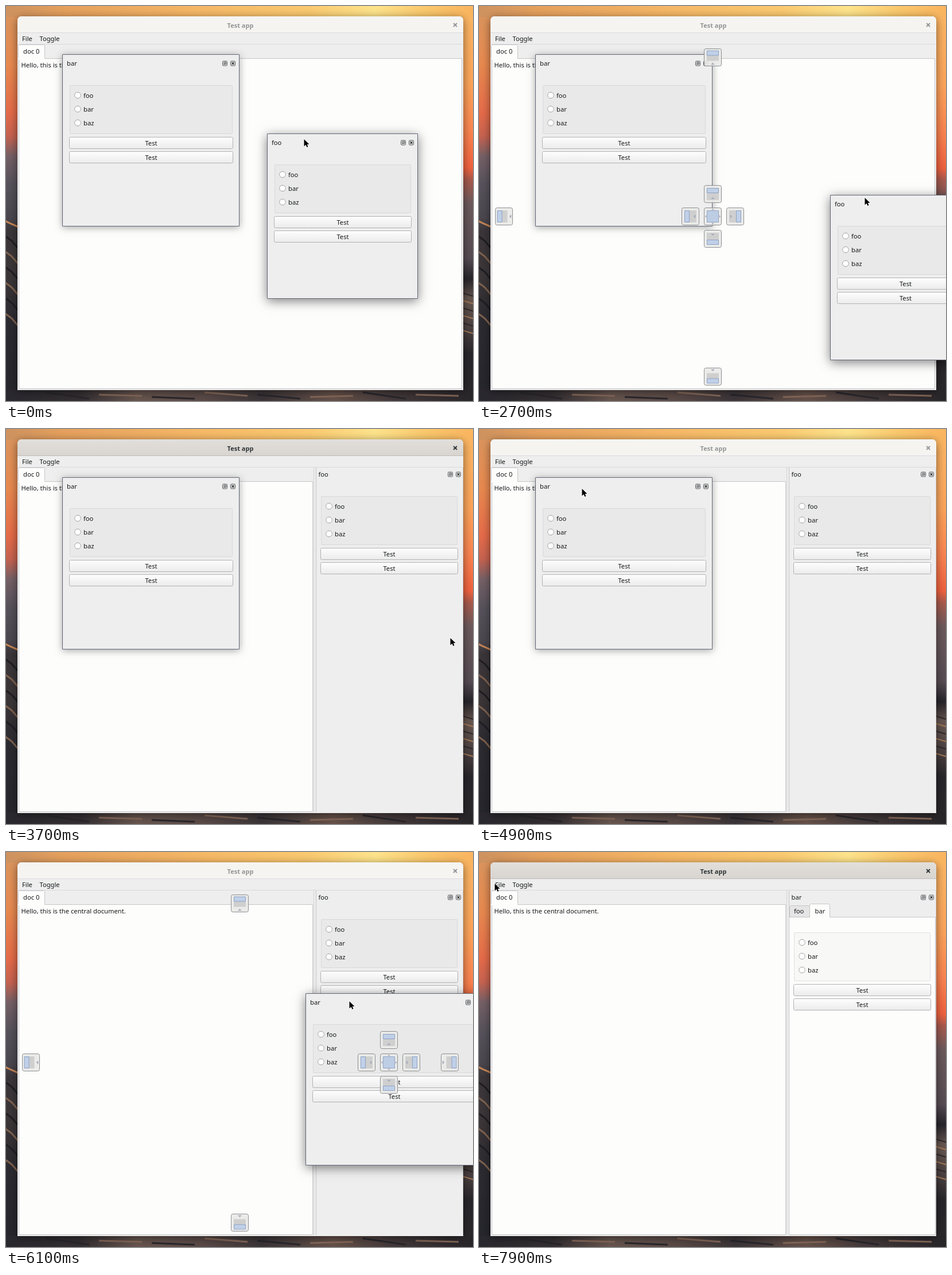
An HTML page with a canvas for the animation above (8 s loop, 814 by 688 pixels).

```html
<!DOCTYPE html>
<html lang="en">
<head>
<meta charset="utf-8">
<title>Test app</title>
<style>
html, body { margin: 0; width: 814px; height: 688px; overflow: hidden; }
canvas { display: block; }
</style>
</head>
<body>
<canvas id="stage" width="814" height="688"></canvas>
<script>
const c = document.getElementById('stage').getContext('2d');
const FONT = '11.2px "Noto Sans", sans-serif';
const BG = '#eeeeee', PAGE = '#fdfdfc', LINE = '#c6c6c8';
const LOOP = 8000;
const FOO = { start: 1000, drop: 3500 }, BAR = { start: 4900, drop: 6900 };

// Pointer stops: time, x, y
const stops = [
  [0, 519, 232], [1000, 519, 232], [1800, 519, 262], [2700, 672, 334],
  [3300, 774, 364], [3700, 774, 364], [4700, 179, 104], [4900, 179, 104],
  [5600, 515, 122], [6500, 661, 364], [6900, 661, 364], [7800, 27, 55], [LOOP, 27, 55]
];

function pointerAt(t) {
  const i = stops.findIndex(s => s[0] > t);
  const [t0, x0, y0] = stops[i - 1], [t1, x1, y1] = stops[i];
  const u = (t - t0) / (t1 - t0);
  const k = (u + u * u * (3 - 2 * u)) / 2;
  return { x: Math.round(x0 + (x1 - x0) * k), y: Math.round(y0 + (y1 - y0) * k) };
}

function gradient(x0, y0, x1, y1, colors) {
  const g = c.createLinearGradient(x0, y0, x1, y1);
  colors.forEach(([at, color]) => g.addColorStop(at, color));
  return g;
}

function rect(x, y, w, h, fill) {
  c.fillStyle = fill;
  c.fillRect(x, y, w, h);
}

function box(x, y, w, h, fill, stroke, r = 0) {
  c.beginPath();
  c.roundRect(x + .5, y + .5, w - 1, h - 1, r);
  if (fill) { c.fillStyle = fill; c.fill(); }
  if (stroke) { c.strokeStyle = stroke; c.lineWidth = 1; c.stroke(); }
}

function line(color, width, ...p) {
  c.beginPath();
  for (let i = 0; i < p.length; i += 2) c.lineTo(p[i], p[i + 1]);
  c.strokeStyle = color;
  c.lineWidth = width;
  c.stroke();
}

function text(s, x, y, color = '#16181a', align = 'left', font = FONT) {
  c.font = font;
  c.textAlign = align;
  c.fillStyle = color;
  c.fillText(s, x, y);
}

function shadowed(blur, dy, alpha, draw) {
  c.save();
  c.shadowColor = `rgba(0,0,0,${alpha})`;
  c.shadowBlur = blur;
  c.shadowOffsetY = dy;
  draw();
  c.restore();
}

function wallpaper() {
  rect(0, 0, 407, 688, gradient(0, 0, 0, 688, [
    [0, '#d9965f'], [.15, '#e8894f'], [.27, '#e56b49'], [.33, '#c66250'], [.38, '#756066'],
    [.45, '#57525b'], [.535, '#4b474f'], [.57, '#3a3539'], [.68, '#3b3537'],
    [.8, '#2b2a30'], [1, '#25252c']]));
  rect(407, 0, 407, 688, gradient(0, 0, 0, 688, [
    [0, '#fbb864'], [.2, '#fda45a'], [.32, '#fb8450'], [.41, '#f0623f'], [.44, '#a95a4d'],
    [.5, '#6d5a5d'], [.64, '#564c53'], [.69, '#27242a'], [.74, '#66564f'],
    [.82, '#4a4040'], [.88, '#29262b'], [1, '#2b282c']]));
  rect(0, 0, 814, 19, gradient(0, 0, 814, 0, [
    [0, '#cd925f'], [.12, '#e5a05d'], [.4, '#f6b766'], [.65, '#fbca70'],
    [.79, '#fee48c'], [.9, '#fbc86c'], [1, '#fab45f']]));
  rect(0, 668, 814, 20, gradient(0, 0, 814, 0, [
    [0, '#29282e'], [.16, '#342f32'], [.28, '#67554e'], [.42, '#5a4a47'],
    [.55, '#3a3437'], [.7, '#665149'], [.83, '#43393a'], [1, '#282529']]));
  // Wave crests and ripples
  line('#c78756', 3, -2, 374, 8, 379, 22, 385);
  for (let i = 0; i < 6; i++) {
    line(i % 2 ? '#806350' : '#1e1d23', 3, -2, 400 + i * 27, 10, 409 + i * 27, 22, 423 + i * 27);
    line(i % 2 ? '#a17756' : '#302b2e', 2, 796, 500 + i * 13, 816, 506 + i * 13);
  }
  for (let i = 0; i < 8; i++)
    line(i % 2 ? '#86695a' : '#29272c', 3, 70 + i * 92, 673 + i % 3 * 4, 145 + i * 92, 684 - i % 2 * 5);
}

function dockButtons(right, y) {
  for (const x of [right - 25.5, right - 11.5]) {
    box(x - 4.5, y - 4.5, 9, 9, '#e4e4e4', '#55585b', 1.5);
  }
  let x = right - 25.5;
  c.strokeRect(x - 1.5, y - 2, 3.5, 3.5);
  line('#55585b', 1, x - 2.5, y + 2.5, x + 1, y - 1);
  x = right - 11.5;
  line('#303335', 1.4, x - 2, y - 2, x + 2, y + 2);
  line('#303335', 1.4, x + 2, y - 2, x - 2, y + 2);
}

// Radio group with two push buttons below it
function form(x, y, w, fill = '#e9e9e9') {
  c.setLineDash([1, 1]);
  box(x, y, w, 85, fill, '#c5c5cf', 1);
  c.setLineDash([]);
  ['foo', 'bar', 'baz'].forEach((name, i) => {
    const cy = y + 17.5 + i * 24;
    c.beginPath();
    c.arc(x + 14, cy, 5.3, 0, 7);
    c.fillStyle = '#fff';
    c.fill();
    c.strokeStyle = '#a3a4a6';
    c.lineWidth = 1;
    c.stroke();
    text(name, x + 24, cy + 4.5);
  });
  for (const top of [y + 90, y + 115.5]) {
    const by = Math.floor(top);
    box(x - 1, by, w + 2, 21, gradient(0, by, 0, by + 21, [[0, '#fefefe'], [1, '#ebebeb']]), '#b2b2b5', 2);
    text('Test', x + w / 2, by + 14.5, undefined, 'center');
  }
}

function floating(name, x, y, w, h, active) {
  shadowed(active ? 18 : 12, active ? 4 : 2, active ? .5 : .35, () => rect(x, y, w, h, BG));
  box(x, y, w, h, BG, '#646878');
  text(name, x + 8, y + 20);
  dockButtons(x + w, y + 16);
  form(x + 13, y + 54, w - 25);
}

function mainWindow(active, split) {
  shadowed(16, 3, .5, () => {
    c.beginPath();
    c.roundRect(20, 18, 777, 651, [7, 7, 0, 0]);
    c.fillStyle = BG;
    c.fill();
  });
  c.beginPath();
  c.roundRect(20, 18, 777, 29, [7, 7, 0, 0]);
  c.fillStyle = active ? gradient(0, 18, 0, 47, [[0, '#e2dfdb'], [1, '#d8d4d0']]) : '#f5f4f1';
  c.fill();
  rect(20, 46, 777, 1, active ? '#c0bbb5' : '#dedbe0');
  const ink = active ? '#2e3436' : '#929595';
  text('Test app', 408.5, 37.5, ink, 'center', 'bold 11px "Noto Sans", sans-serif');
  line(ink, 1.8, 780, 30, 786, 36);
  line(ink, 1.8, 786, 30, 780, 36);
  text('File', 28, 60.5);
  text('Toggle', 58.5, 60.5);
  rect(21, 66, 775, 1, '#d9d9df');

  const right = split ? 535 : 795;
  box(22, 91, right - 22, 576, PAGE, LINE);
  box(21, 67, 47, 25, PAGE, LINE, 2);
  rect(22, 90, 45, 3, PAGE);
  text('doc 0', 30, 83);
  text('Hello, this is the central document.', 26.5, 106.5);
  if (split) {
    rect(536, 67, 1, 600, '#d2d2d4');
    rect(540, 67, 1, 600, LINE);
    rect(796, 67, 1, 600, '#d2d2d4');
  }
}

function dock(tabbed) {
  text(tabbed ? 'bar' : 'foo', 544.5, 83);
  dockButtons(800, 79);
  if (!tabbed) return form(549, 117, 238);
  box(540, 113, 256, 554, PAGE, LINE);
  box(541, 93, 36, 21, '#e5e5e6', LINE, 2);
  box(576, 90, 36, 25, PAGE, LINE, 2);
  rect(577, 112, 34, 4, PAGE);
  text('foo', 549, 107);
  text('bar', 585.5, 106.5);
  form(549, 140, 238, '#f8f8f7');
}

function dropShade() {
  box(540, 67, 257, 601, 'rgba(138,180,214,.6)', '#8297ac');
}

function arrow(y, size, color) {
  c.beginPath();
  c.moveTo(-size, y + size / 2);
  c.lineTo(size, y + size / 2);
  c.lineTo(0, y - size / 2);
  c.fillStyle = color;
  c.fill();
}

// turn: quarter turns from "top"; kind: outer, inner or center
function indicator(x, y, turn, kind, hot) {
  const tint = hot ? '#3584f0' : '#a9adbd';
  c.save();
  c.globalAlpha = .92;
  box(x - 15, y - 15, 31, 31, '#e9e9e7', '#85878a', 3);
  c.globalAlpha = 1;
  c.translate(x + .5, y + .5);
  c.rotate(turn * Math.PI / 2);
  if (kind === 'center') {
    box(-10.5, -10.5, 21, 21, '#bdcde4', '#94a6c6');
    for (let i = 0; i < 4; i++) {
      arrow(-12.5, hot ? 4 : 2.5, tint);
      c.rotate(Math.PI / 2);
    }
  } else {
    const outer = kind === 'outer', top = outer ? -12 : -10.5;
    rect(-10.5, top + 8, 21, outer ? 10 : 13, '#cfcfcf');
    box(-10.5, top, 21, 9, '#c0d0e8', '#8ea1c3');
    arrow(outer ? 11 : 7, 3.5, tint);
  }
  c.restore();
}

function indicators(x, split, hotRight, hotCenter) {
  indicator(407, 89, 0, 'outer');
  indicator(773, 366, 1, 'outer', hotRight);
  indicator(407, 645, 2, 'outer');
  indicator(43, 366, 3, 'outer');
  indicator(x, 327, 0, 'inner');
  indicator(x + 39, 366, 1, 'inner');
  indicator(x, 405, 2, 'inner');
  indicator(x - 39, 366, 3, 'inner');
  indicator(x, 366, 0, 'center', hotCenter);
}

function pointer({ x, y }) {
  c.beginPath();
  [[0, 0], [0, 12.5], [3, 9.8], [5, 14], [7, 13], [5.2, 9], [9, 8.8]]
    .forEach(([dx, dy]) => c.lineTo(x + dx + .5, y + dy));
  c.closePath();
  c.strokeStyle = '#fff';
  c.lineWidth = 1.6;
  c.stroke();
  c.fillStyle = '#000';
  c.fill();
}

function draw(t) {
  const p = pointerAt(t);
  const split = t >= FOO.drop, tabbed = t >= BAR.drop;
  const fooDrag = t > FOO.start && !split;
  const barDrag = t > BAR.start && !tabbed;
  const active = split && t < 4800 || tabbed;
  const overDock = barDrag && p.x > 540;
  const hotRight = fooDrag && p.x > 757;
  const hotCenter = overDock && Math.abs(p.x - 667) < 16 && Math.abs(p.y - 366) < 16;

  wallpaper();
  mainWindow(active, split);
  if (split) dock(tabbed);
  if (hotRight || hotCenter) dropShade();

  const bar = { x: 98, y: 84 };
  if (barDrag) {
    const late = t >= 5700;
    bar.x = p.x - (late ? 76 : 81);
    bar.y = p.y - (late ? 14 : 20);
  }
  const marks = () => indicators(overDock ? 667 : split ? 277 : 407, split, hotRight, hotCenter);
  if (barDrag && !overDock) marks();
  if (!tabbed) floating('bar', bar.x, bar.y, 309, 300, barDrag);
  if (fooDrag || overDock) marks();
  if (!split) {
    if (fooDrag) floating('foo', p.x - 60, p.y - 5, 262, 288, true);
    else floating('foo', 455, 222, 263, 288, true);
  }
  pointer(p);
}

function tick(now) {
  draw(Math.floor(now % LOOP / 100) * 100);
  requestAnimationFrame(tick);
}
requestAnimationFrame(tick);
</script>
</body>
</html>
```
